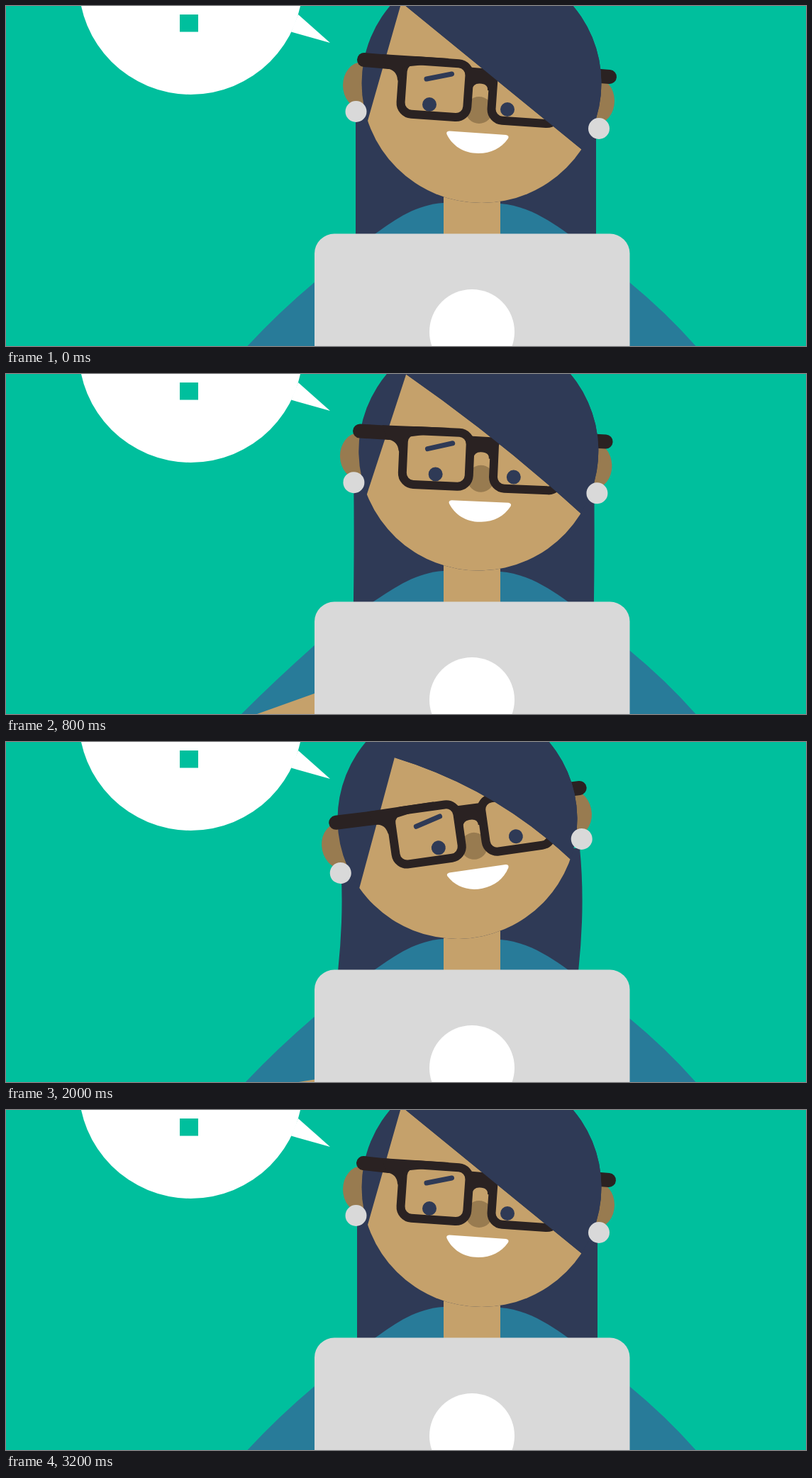
Animation, 1128 px wide and 480 px high, one loop 3.24 s. Source, as an HTML page:

```html
<!DOCTYPE html>
<html lang="en">
<head>
<meta charset="utf-8">
<title>Typing at a laptop</title>
<style>
  html, body { margin: 0; width: 100%; height: 100%; overflow: hidden; background: #00bf9d; }
  svg { display: block; width: 100%; height: 100%; }
  .hair { fill: #2f3a56; }
  .skin { fill: #c5a16b; }
  .shade { fill: #987b50; }
  .shirt { fill: #287b99; }
  .grey { fill: #d9d9d9; }
  .white { fill: #fff; }
  .frame { fill: #2a2222; }
  .line { fill: none; stroke: #2a2222; stroke-width: 12; }
  .temple { stroke-width: 20; stroke-linecap: round; }
</style>
</head>
<body>
<svg viewBox="0 0 1128 480">
  <defs>
    <clipPath id="skull"><circle cx="670.5" cy="109" r="169"/></clipPath>
  </defs>
  <rect width="1128" height="480" fill="#00bf9d"/>

  <g class="white">
    <circle cx="260.5" cy="-33" r="158"/>
    <path d="M412 12 457 52 402 36.5Z"/>
  </g>
  <rect x="245" y="12" width="26" height="24.500" fill="#00bf9d"/>

  <path id="backHair" class="hair"/>
  <path id="shirt" class="shirt"/>
  <path id="forearm" class="skin"/>
  <rect class="skin" x="617" y="230" width="80" height="100"/>

  <g id="head">
    <g class="shade">
      <ellipse cx="502" cy="112" rx="27" ry="33"/>
      <ellipse cx="831" cy="134" rx="27" ry="33"/>
    </g>
    <path id="rightTemple" class="line temple"/>
    <circle class="hair" cx="670.5" cy="109" r="169"/>
    <g clip-path="url(#skull)">
      <path id="face" class="skin"/>
      <g id="features">
        <circle class="shade" cx="667" cy="147" r="19"/>
        <g id="eyes" class="hair">
          <circle cx="597" cy="139" r="10"/>
          <circle cx="707" cy="146" r="10"/>
        </g>
        <path d="M593 103 628.500 96" stroke="#2f3a56" stroke-width="7" stroke-linecap="round"/>
        <path class="white" d="M625 176.500 705 182Q710 183 708 187C698 201 684 208 666 208C645 208 629 197 621.500 181Q620 177 625 176.500Z"/>
        <g class="line">
          <rect x="-47" y="-38" width="94" height="76" rx="16" transform="translate(605 117) rotate(4)"/>
          <rect x="-47" y="-38" width="94" height="76" rx="16" transform="translate(733 126) rotate(4)"/>
        </g>
        <path class="frame" d="M648 86 696 90 686 120 679 119Q680 110 668 109.500Q659 109 657 118L650 118Z"/>
      </g>
      <path id="fringe" class="hair"/>
    </g>
    <path id="leftTemple" class="line temple"/>
    <path id="hinge" class="frame"/>
    <g class="grey">
      <circle cx="493.500" cy="149" r="15"/>
      <circle cx="836" cy="173" r="15"/>
    </g>
  </g>

  <rect class="grey" x="435" y="321.500" width="444.500" height="220" rx="28"/>
  <circle class="white" cx="657" cy="460" r="60"/>
</svg>
<script>
const LOOP = 3240, CYCLE = 1600, STEP = 40, TAP = 320;
const el = id => document.getElementById(id);
const set = (id, name, value) => el(id).setAttribute(name, value);
const draw = (id, path) => set(id, 'd', path);
const mix = (a, b, k) => a + (b - a) * k;
const point = (a, b, k) => `${mix(a[0], b[0], k)} ${mix(a[1], b[1], k)}`;

function ease(t, start, end) {
  const k = Math.min(1, Math.max(0, (t - start) / (end - start)));
  return k * k * (3 - 2 * k);
}

function drawHead(tilt, turn, drift) {
  set('head', 'transform', `rotate(${-12.06 * tilt} 653 270)`);
  const shiftX = 18.5 * turn, shiftY = 4 * turn;
  set('features', 'transform', `translate(${shiftX} ${shiftY})`);
  set('eyes', 'transform', `translate(${20.5 * turn} 0)`);

  const tip = point([557.5, -5], [602, 5.5], turn);
  const bend = point([684, 98.5], [732, 78], turn);
  const end = point([811, 202], [814.6, 198], turn);
  const cheek = point([510, 162], [514.6, 176], turn);
  draw('face', `M${tip}Q${bend} ${end}L850 300 480 300 ${cheek}Z`);
  draw('fringe', `M${tip}Q${bend} ${end}L900 200 900 -80 560 -80Z`);

  // The temples stay at the ears while the lenses slide across the face.
  const dx = -3 * turn - drift, dy = 2 * turn - drift;
  draw('rightTemple', `M800 ${96 + dy}L${851 + dx} ${100 + dy}`);
  draw('leftTemple', `M${505 + dx} ${76 + dy}L${540 + shiftX} ${79 + shiftY}`);
  const p = (x, y) => `${x + shiftX} ${y + shiftY} `;
  draw('hinge', `M${p(530, 68)}L${p(625, 74)}${p(600, 82)}${p(560, 86)}${p(556, 112)}${p(552, 104)}Q${p(551, 90)}${p(536, 88)}Z`);
}

function drawBackHair(tilt, drift) {
  const base = 493 + 2 * drift;
  const top = base - 23 * tilt, mid = base - 15 * tilt, low = base - 25 * tilt;
  const w = 339;
  draw('backHair', `M${top} 150Q${mid} 230 ${low} 324H${low + w}Q${mid + w} 230 ${top + w} 150Z`);
}

function drawArms(lift) {
  const edgeY = 390 - 7 * lift, footX = 340.5 - 8.5 * lift;
  draw('shirt', `M617 278C580 280 550 300 ${520 - 3 * lift} 322L435 ${edgeY}Q${385 - 5 * lift} 432 ${footX} 480` +
    `H972.500Q930 432 879 390L793 322C765 302 735 282 697 279Z`);
  draw('forearm', `M354 ${mix(493, 480, lift)}L435 ${mix(488, 451, lift)}V500H354Z`);
}

function render(now) {
  const t = Math.floor(now % LOOP / STEP) * STEP;
  const phase = t ? (t - STEP) % CYCLE + STEP : 0;
  const tilt = ease(phase, 0, 400) - ease(phase, 480, 890);
  const turn = ease(phase, 0, 400) - ease(phase, 520, 964);
  const drift = ease(phase, 900, CYCLE);
  const lift = Math.pow(Math.sin(Math.PI * phase / TAP) ** 2, 1.7);
  drawBackHair(tilt, drift);
  drawHead(tilt, turn, drift);
  drawArms(lift);
}

const started = performance.now();
function tick() {
  render(performance.now() - started);
  requestAnimationFrame(tick);
}
tick();
</script>
</body>
</html>
```
